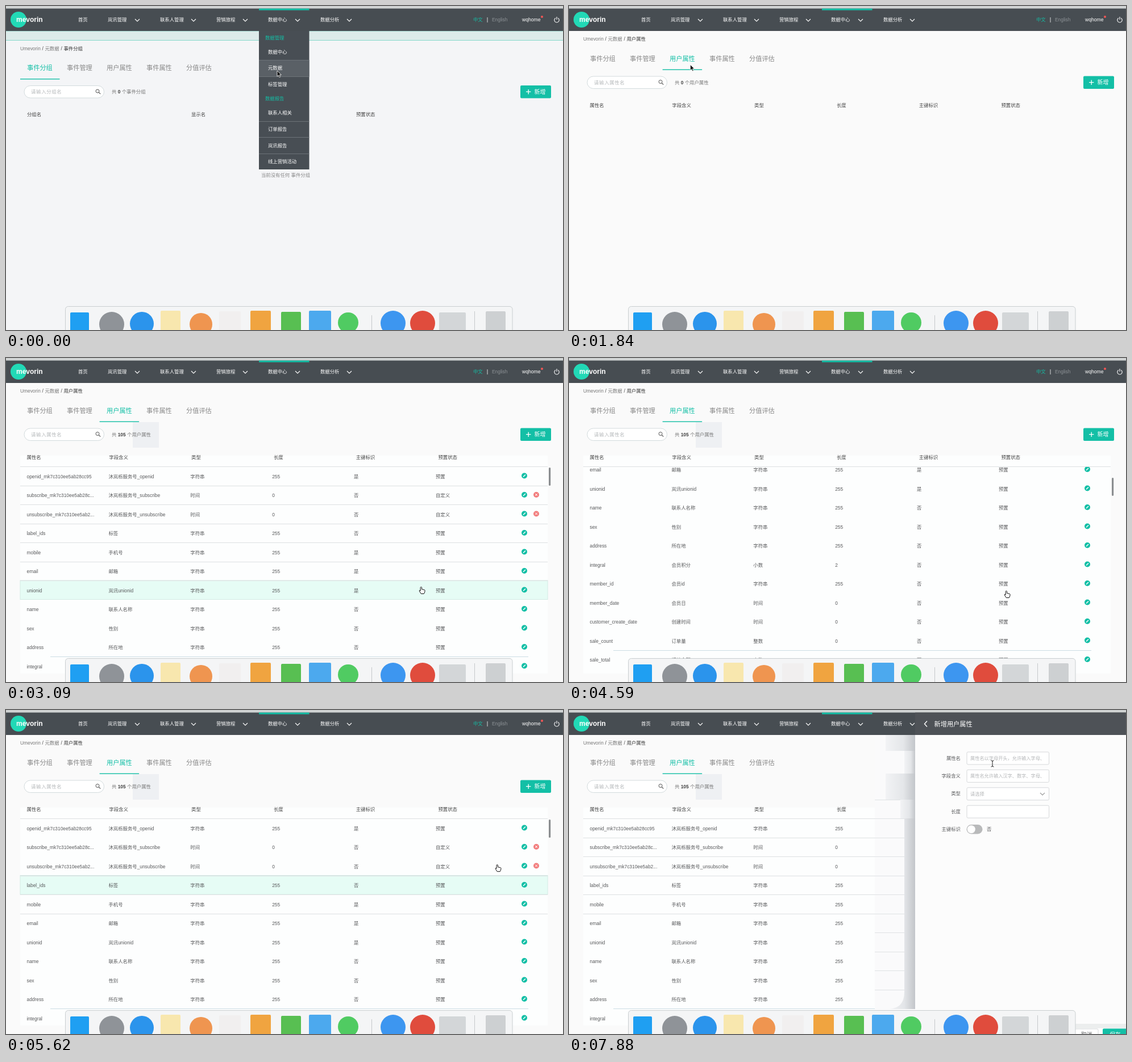
An HTML page that plays this animation: 980 px wide and 571 px high, repeating every 8 s.

```html
<!DOCTYPE html>
<html lang="zh">
<head>
<meta charset="utf-8">
<title>用户属性</title>
<style>
  html, body { margin: 0; width: 980px; height: 571px; overflow: hidden; background: #fafafa; }
  svg { display: block; }
  text { font-family: "Liberation Sans", "Noto Sans CJK SC", "Noto Sans CJK", sans-serif; white-space: pre; }
</style>
</head>
<body>
<svg id="stage" width="980" height="571" viewBox="0 0 980 571"></svg>
<script>
const LOOP = 8000, ROW = 33.5, TOP = 191;
const TEAL = '#13bfa6', INK = '#58595b', DARK = '#474d52';

// ---- drawing helpers ----
const rect = (x, y, w, h, fill, extra = '') =>
  `<rect x="${x}" y="${y}" width="${w}" height="${h}" fill="${fill}" ${extra}/>`;
const disc = (x, y, r, fill, extra = '') =>
  `<circle cx="${x}" cy="${y}" r="${r}" fill="${fill}" ${extra}/>`;
const path = (d, color, w = 1, extra = '') =>
  `<path d="${d}" fill="none" stroke="${color}" stroke-width="${w}" ${extra}/>`;
const text = (x, mid, s, fill = INK, size = 8.4, extra = '') =>
  `<text x="${x}" y="${(mid + size * 0.37).toFixed(2)}" font-size="${size}" fill="${fill}" ${extra}>${s}</text>`;
const group = (id, body, extra = '') => `<g id="${id}" ${extra}>${body}</g>`;
const hline = (x1, x2, y, color = '#dfe2e4') => rect(x1, Math.round(y), x2 - x1, 1, color);
const chevron = (x, y, color = '#fff') => path(`M${x - 4} ${y - 2}l4 4 4-4`, color, 1.1);
const bold = 'font-weight="bold"', medium = 'font-weight="500"';

const editIcon = (x, y) => disc(x, y, 5, TEAL) + path(`M${x - 2} ${y + 2}l4-4`, '#fff', 1.4);
const dropIcon = (x, y) => disc(x, y, 5, '#f27d7d') +
  path(`M${x - 2} ${y - 2}l4 4m0-4l-4 4`, '#fff', 1);

// ---- top bar ----
function navBar() {
  const items = [[127, '首页'], [179, '岚讯管理', 231], [271, '联系人管理', 330],
    [370, '营销旅程', 421], [461, '数据中心', 513], [553, '数据分析', 604]];
  return rect(0, 0, 980, 5, '#d0d3d3') + rect(0, 4.5, 980, 39.5, DARK) +
    group('navOn', rect(445, 5, 88.5, 39, '#535a60')) +
    rect(445, 4.5, 88.5, 3, TEAL) +
    disc(22, 24, 14, '#22d9b6') +
    text(18, 23.5, 'mevorin', '#fff', 12, bold) +
    items.map(([x, s, c]) => text(x, 24, s, '#fff') + (c ? chevron(c, 25) : '')).join('') +
    text(822, 24, '中文', TEAL) + rect(846.5, 20, 1, 9, '#d5d7d8') +
    text(855, 24, 'English', '#8d9296') +
    text(908, 24, 'wqhome', '#fff', 8.6) + disc(943, 19, 2, '#f25555') +
    path('M966.8 21.2a4.2 4.2 0 1 0 4.4 0M969 19v5', '#fff', 1.1);
}

function menu() {
  const items = [[81, '数据中心'], [109, '元数据'], [138, '标签管理'], [188, '联系人相关'],
    [217, '订单报告'], [245.5, '岚讯报告'], [274, '线上营销活动']];
  return rect(445, 44, 88.5, 244, '#484e54') + rect(445, 95, 88.5, 29, '#5a6066') +
    [95, 124, 203, 231, 260].map(y => hline(445, 533.5, y, '#6d7378')).join('') +
    text(456, 56, '数据管理', TEAL) + text(456, 163, '数据报告', TEAL) +
    items.map(([y, s]) => text(461, y, s, '#fff')).join('');
}

// ---- page head: crumbs, tabs, search ----
const TABS = ['事件分组', '事件管理', '用户属性', '事件属性', '分值评估'];
function pageHead() {
  return group('tabBar', rect(0, 72, 980, 40, '#fff')) +
    text(25, 58, 'Umevorin', '#777') + text(63.5, 58, '/', '#444') + text(68.5, 58, '元数据', '#777') +
    text(96.5, 58, '/', '#444') + text(101.5, 58, '', '#333', 8.4, 'id="crumb" ' + medium) +
    TABS.map((s, i) => text(37 + 70 * i, 92.5, s, '#888', 11.2, `id="tab${i}"`)).join('') +
    rect(25, 111.5, 69.5, 1.4, TEAL, 'id="under"') +
    group('block', rect(223, 113, 46, 45, '#eef0f3')) +
    rect(32, 124, 140.5, 21.5, '#fff', 'rx="10.75" stroke="#d3dbdd" stroke-width="1"') +
    text(44, 134.5, '', '#b5b8ba', 8.4, 'id="hint" letter-spacing="0.7"') +
    disc(161, 133.5, 3, 'none', 'stroke="#555" stroke-width="1"') + path('M163.2 135.7l3 3', '#555', 1.2) +
    `<text x="186" y="137.6" font-size="8.4" fill="#777">共 <tspan id="count" fill="#444" ${bold}></tspan> 个<tspan id="unit"></tspan></text>` +
    rect(905, 123.5, 54, 22.5, TEAL, 'id="add" rx="2"') +
    path('M915 134.7h8.4m-4.2-4.2v8.4', '#fff', 1.3) +
    text(929.5, 134.7, '新增', '#fff', 10, medium);
}

// ---- event groups ----
const EVENTS = ['默认分组|默认分组', 'email|邮件事件', 'mobile|短信事件', 'yunmsg|岚讯事件', 'form|表单事件',
  'label|标签事件', 'attributeChange|属性变更', 'order|订单事件', 'testhahaha123|testhahaha123'];
const eventHead = () => [[37, '分组名'], [326, '显示名'], [616, '预置状态']]
  .map(([x, s]) => text(x, 174.5, s, '#444', 8.4, medium)).join('');

function eventRows() {
  let out = rect(25.5, 157.5, 933.5, 335.5, '#fff', 'stroke="#e1e4e6"');
  EVENTS.forEach((line, i) => {
    const [a, b] = line.split('|'), y = 208.5 + ROW * i, own = i === 8;
    out += hline(25, 959, TOP + ROW * i) + text(37, y, a) + text(326, y, b) +
      text(616, y, own ? '自定义' : '预置') + editIcon(918, y - 1) + (own ? dropIcon(939, y - 1) : '');
  });
  const box = (x, edge) => rect(x + 0.5, 505, 21.5, 21.5, '#fff', `rx="2" stroke="${edge}"`);
  return out + box(853, '#e6e8ea') + box(881, TEAL) + box(909, '#e6e8ea') + box(937, '#e6e8ea') +
    path('M868.5 515.7h-8m3.5-3.5l-3.5 3.5 3.5 3.5', '#b5b8ba') +
    path('M944 515.7h8m-3.5-3.5l3.5 3.5-3.5 3.5', '#444') +
    text(892, 515.7, '1', TEAL, 8.4, 'text-anchor="middle"') +
    text(920, 515.7, '2', INK, 8.4, 'text-anchor="middle"');
}

// ---- user attributes ----
const USERS = `openid_mk7c310ee5ab28cc95|沐岚栎服务号_openid|字符串|255|是
subscribe_mk7c310ee5ab28c...|沐岚栎服务号_subscribe|时间|0|否|1
unsubscribe_mk7c310ee5ab2...|沐岚栎服务号_unsubscribe|时间|0|否|1
label_ids|标签|字符串|255|否
mobile|手机号|字符串|255|是
email|邮箱|字符串|255|是
unionid|岚讯unionid|字符串|255|是
name|联系人名称|字符串|255|否
sex|性别|字符串|255|否
address|所在地|字符串|255|否
integral|会员积分|小数|2|否
member_id|会员id|字符串|255|否
member_date|会员日|时间|0|否
customer_create_date|创建时间|时间|0|否
sale_count|订单量|整数|0|否
sale_total|订单金额|小数|2|否`.split('\n');

const userHead = () => ['属性名', '字段含义', '类型', '长度', '主键标识', '预置状态']
  .map((s, i) => text(36.5 + 144.8 * i, 174.5, s, '#444', 8.4, medium)).join('');

function userRows() {
  let out = rect(25, 0, 928, ROW, '#e6fcf5', 'id="hover" stroke="#d3ebe4" stroke-width="1"');
  USERS.forEach((line, i) => {
    const [a, b, type, len, key, own] = line.split('|'), y = 208.5 + ROW * i;
    out += [a, b, type, len, key, own ? '自定义' : '预置']
      .map((s, c) => text(36.5 + 143.9 * c, y, s)).join('') +
      editIcon(912, y - 1) + (own ? dropIcon(933, y - 1) : '');
  });
  return out;
}

const rules = () => Array.from({ length: 7 }, (_, k) =>
  group('rule' + k, hline(25, 953, TOP + ROW * k, '#dde0e2'))).join('');

// ---- side panel ----
function panel() {
  const fields = [['属性名', '属性名以字母开头，允许输入字母、'], ['字段含义', '属性名允许输入汉字、数字、字母、'],
    ['类型', '请选择'], ['长度', '']];
  const shade = (x, y, h) => rect(x, y, 609 - x, h, 'url(#shade)');
  let out = rect(538, 44, 71, 527, '#fafafb') +
    Array.from({ length: 11 }, (_, k) => hline(538, 609, 157.5 + ROW * k)).join('') +
    shade(557, 44, 28) + shade(590, 72, 40) + shade(557, 112, 46) + shade(583, 158, 33) +
    `<path d="M590 191h19v336h-49q30 0 30-30z" fill="url(#shade)"/>` +
    rect(609, 44, 371, 527, '#fcfcfc') + rect(609, 4.5, 371, 39.5, '#4e5257') +
    path('M630 19.5l-4.5 5 4.5 5', '#fff', 1.4) + text(642.5, 24.5, '新增用户属性', '#fff', 11.2, medium);
  fields.forEach(([label, hint], i) => {
    const mid = 85 + 31.4 * i;
    out += text(689, mid - 0.5, label, INK, 8.4, 'text-anchor="end"') +
      rect(700, mid - 11, 144.5, 22, '#fff', 'rx="2" stroke="#d6d8da"') +
      text(706, mid, hint, '#b4b6b8', 8.2);
  });
  return out + chevron(833, 148, '#999') +
    text(689, 210, '主键标识', INK, 8.4, 'text-anchor="end"') +
    rect(699.5, 202, 28, 16.5, '#b9babb', 'rx="8.25"') + disc(707.8, 210.2, 7, '#fff') +
    text(735, 210, '否') +
    rect(885, 553, 95, 8, '#eceeee') + rect(885, 561, 95, 10, '#fff') +
    rect(890, 562, 41, 20, '#fff', 'rx="2" stroke="#d6d8da"') + text(901, 572, '取消', INK, 9.8) +
    rect(939, 561.5, 45, 20, TEAL, 'rx="2"') + text(951, 572, '保存', '#fff', 9.8, medium);
}

// ---- dock ----
function dock() {
  const squares = [[113, 540, 33, '#1f9ff2'], [272, 537, 35, '#f8e7ae'], [375, 538, 38, '#f1efef'],
    [430, 537, 36, '#f0a440'], [484, 539, 35, '#58bf52'], [533, 537, 39, '#4ca9ee'],
    [762, 540, 47, '#d3d6d8'], [844, 538, 35, '#cdd0d2']];
  const discs = [[186, 561, 22, '#8f9398'], [239, 560, 21, '#2b94ec'], [343, 561, 20, '#ef9550'],
    [602, 558, 18, '#50cb62'], [681, 559, 22, '#3d96f0'], [733, 559, 22, '#e04c3d']];
  return rect(104.5, 529.5, 786.5, 60, '#f4f5f6', 'rx="5" stroke="#c9ced0"') +
    squares.map(([x, y, w, c]) => rect(x, y, w, w, c, 'rx="2"')).join('') +
    discs.map(d => disc(...d)).join('') +
    rect(643, 545, 1, 26, '#c5c8ca') + rect(824, 538, 1, 33, '#c5c8ca');
}

const pointers =
  group('arrow', '<path d="M0 0v10.2l2.4-2.2 1.7 3.7 1.7-.8-1.6-3.6h3.2z" fill="#111" stroke="#fff" stroke-width=".8"/>') +
  group('hand', '<path d="M-1.3 1.2a1.2 1.2 0 0 1 2.4 0v3l4.3.8q1.4.4 1.2 2l-.6 2.6-1.2 2.4h-5L-3 7.6q-.8-1.5.4-1.8l1.3 1z" fill="#fff" stroke="#111" stroke-width="1"/>') +
  group('beam', path('M-2.5-5.5q2.5 0 2.5 1.5q0-1.5 2.5-1.5M0-4.5v9M-2.5 5.5q2.5 0 2.5-1.5q0 1.5 2.5 1.5', '#222'));

document.getElementById('stage').innerHTML =
  `<defs><linearGradient id="shade"><stop offset="0" stop-color="#f2f3f5"/><stop offset=".6" stop-color="#e4e6e9"/>
  <stop offset="1" stop-color="#c3c6ca"/></linearGradient>
  <clipPath id="view"><rect x="0" y="191" width="980" height="365"/></clipPath></defs>` +
  rect(0, 0, 980, 571, '#fafafa', 'id="bg"') +
  group('foot', rect(0, 530.5, 980, 41, '#f9f9fa')) +
  group('strip', rect(0, 44, 980, 16, '#dcebea') + hline(0, 980, 44, '#a9ddd5') + hline(0, 980, 60, '#86d8cb')) +
  group('page', pageHead() +
    group('groups', group('list', eventRows()) + eventHead() +
      group('none', text(449, 281, '当前没有任何 事件分组', '#888'))) +
    group('users', group('sheet', rect(25, 172, 928, 384, '#fdfefe')) +
      group('data', group('rows', userRows()), 'clip-path="url(#view)"') +
      group('edge', hline(78, 919, 0, '#cbdde4')) +
      rules() + userHead() + rect(955, 193, 3.2, 32, '#8b8e90', 'id="thumb" rx="1.6"'))) +
  navBar() + group('menu', menu()) + group('panel', panel()) + dock() + group('cursor', pointers);

// ---- timeline ----
const el = {};
document.querySelectorAll('[id]').forEach(n => el[n.id] = n);
const show = (id, on) => el[id].setAttribute('display', on ? 'inline' : 'none');
const move = (id, x, y) => el[id].setAttribute('transform', `translate(${x} ${y})`);
const paint = (id, color) => el[id].setAttribute('fill', color);

// bursts of screen updates: first, last, count
const BURSTS = [[0, 0, 1], [440, 1390, 7], [1540, 2500, 7], [2640, 3540, 7], [3690, 3990, 3],
  [4590, 4730, 2], [5030, 6060, 8], [6210, 6360, 2], [6960, 7880, 7]];
const TICKS = BURSTS.flatMap(([a, b, n]) =>
  Array.from({ length: n }, (_, i) => Math.floor(a + (n > 1 ? (b - a) * i / (n - 1) : 0))));

const CURSOR = [[0, 477, 114], [440, 468, 114], [1073, 251, 109.5], [1390, 208, 94], [1540, 206, 94],
  [2020, 228, 122], [2500, 259, 173.5], [3090, 730.5, 403.5], [3540, 769.5, 410.5], [4880, 769.5, 410.5],
  [5619, 864.5, 272.5], [6060, 930, 139], [6210, 932, 133], [6800, 932, 133], [7727, 745, 94.5], [8000, 745, 94.5]];
const SCROLL = [[0, 0], [3690, 50], [3840, 125], [3990, 155], [4590, 179], [4730, 186], [5030, 110], [5177, 35], [5324, 0]];
const HOVER = [[0, -1], [2790, 1], [2940, 4], [3090, 6], [3690, -1], [5324, 5], [5470, 4], [5615, 3], [5760, 1], [5900, -1]];
const RULES = [[0, 1, 0], [2640, 0, 1], [2790, 0, 3], [2940, 0, 5], [3090, 0, 6], [3690, 0, 0], [5324, 3, 5], [6960, 0, 5]];

const step = (keys, t) => keys.filter(k => k[0] <= t).pop();
function between(keys, t) {
  const i = Math.max(1, keys.findIndex(k => k[0] > t));
  const a = keys[i - 1], b = keys[i], p = (t - a[0]) / (b[0] - a[0]);
  return [1, 2].map(n => a[n] + (b[n] - a[n]) * p);
}

function render(t) {
  const loaded = t >= 915, tab = t < 1540 ? 0 : 2, user = tab === 2, filled = t >= 1860;
  const scroll = step(SCROLL, t)[1], hover = step(HOVER, t)[1], [, lo, hi] = step(RULES, t);

  paint('bg', user ? '#fafafa' : loaded ? '#f0f1f3' : '#f4f5f7');
  show('foot', loaded && !user);
  show('strip', !loaded);
  show('tabBar', loaded && !user);
  move('page', 0, loaded ? 0 : 16.5);
  show('menu', t < 598);
  show('navOn', t >= 598 && !user);

  el.crumb.textContent = TABS[tab];
  el.hint.textContent = user ? '请输入属性名' : '请输入分组名';
  el.count.textContent = user ? (filled ? 105 : 0) : loaded ? 14 : 0;
  el.unit.textContent = TABS[tab];
  TABS.forEach((_, i) => {
    paint('tab' + i, i === tab ? TEAL : '#888');
    el['tab' + i].setAttribute('font-weight', i === tab ? 500 : 400);
  });
  el.under.setAttribute('x', 25 + 69.8 * tab);
  show('block', user && filled);
  paint('add', t >= 6210 && t < 6960 ? '#3ccbb5' : TEAL);

  show('groups', !user);
  show('list', loaded);
  show('none', !loaded);

  show('users', user);
  show('data', filled);
  show('edge', filled);
  show('thumb', filled);
  show('sheet', t >= 2640);
  move('rows', 0, -scroll);
  move('edge', 0, Math.round(TOP + ROW * 10 - scroll % ROW));
  move('thumb', 0, scroll * 0.1);
  show('hover', hover >= 0);
  el.hover.setAttribute('y', TOP + ROW * hover);
  for (let k = 0; k < 7; k++) show('rule' + k, (k >= lo && k <= hi) || (k === 0 && t >= 2640));

  show('panel', t >= 6960);
  move('panel', 380 * Math.max(0, 1 - (t - 6900) / 650) ** 3, 0);

  move('cursor', ...between(CURSOR, t));
  const hand = t >= 2640 && t < 7100, beam = t >= 7560;
  show('hand', hand);
  show('beam', beam);
  show('arrow', !hand && !beam);
}

let last = -1;
function frame() {
  const now = performance.now() % LOOP;
  const tick = TICKS.filter(k => k <= now).pop();
  if (tick !== last) render(last = tick);
  requestAnimationFrame(frame);
}
frame();
</script>
</body>
</html>
```
